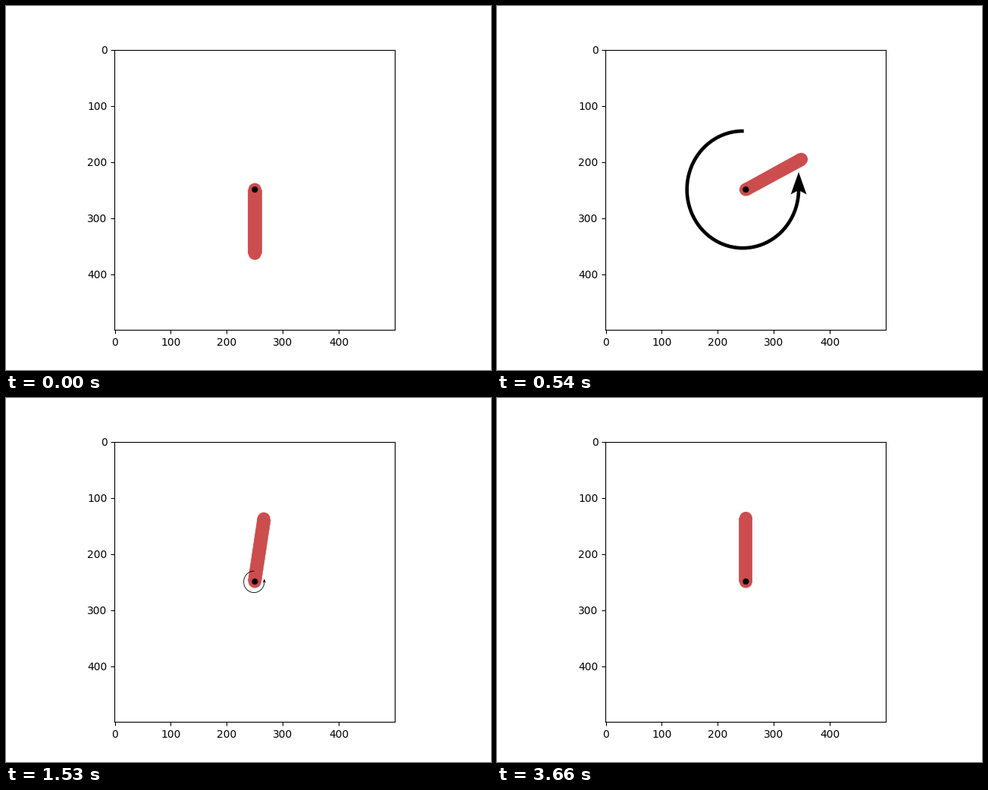
Recreate the animation shown at these times as a matplotlib script. Size 640 px wide and 480 px high, loop 6440 ms.

```python
import numpy as np
import matplotlib.pyplot as plt
from matplotlib.animation import FuncAnimation
from matplotlib.patches import Circle, Polygon

LOOP, TICK = 6440, 20          # ms
SIZE, MID = 500, 250           # canvas in data pixels
UNIT = SIZE / 4.4              # rod length
HALF = 0.1 * UNIT              # half rod width
PX = 0.7392                    # screen pixels per data pixel
RED = (0.8, 0.3, 0.3)
KP, KD, MAX_TORQUE, DT = 17.0, 10.33, 5.0, 0.05


def simulate(steps):
    """Pendulum swung upright by a clipped PD controller."""
    err, speed = np.pi, 0.0
    states = [(err, 0.0)]
    for _ in range(steps):
        torque = np.clip(KP * err - KD * speed, -MAX_TORQUE, MAX_TORQUE)
        speed += DT * (3 * torque - 15 * np.sin(err))
        err -= DT * speed
        states.append((err, torque))
    return states


def step_at(ms):
    if ms < 2340:
        return ms // 30
    return 78 + int((ms - 2340) / 33.333)


def place(along, across, err):
    """Rod coordinates to whole canvas pixels, y pointing down."""
    s, c = np.sin(err), np.cos(err)
    x = int(MID + along * s + across * c)
    y = int(MID + along * c - across * s)
    return x, SIZE - 1 - y


STATES = simulate(200)

# Arrow in units of its own size, centred on zero, y down
ARC = np.radians(np.linspace(89, 360, 140))
RING = np.column_stack([-0.025 + 0.4595 * np.cos(ARC), -0.481 * np.sin(ARC)])
TIP_X = 0.4345
HEAD = np.array([(TIP_X, -0.144), (TIP_X + 0.065, 0.040),
                 (TIP_X, 0.005), (TIP_X - 0.065, 0.040)])

fig, ax = plt.subplots(figsize=(6.4, 4.8), dpi=100)
ax.set_aspect("equal")
ax.set_xlim(-0.5, SIZE - 0.5)
ax.set_ylim(SIZE - 0.5, -0.5)

pivot = (MID, SIZE - 1 - MID)
rod = Polygon([pivot] * 4, fc=RED, ec=RED, lw=PX * 0.72, joinstyle="round", zorder=1)
tip = Circle(pivot, 11.5, fc=RED, lw=0, zorder=1.1)
head = Polygon([pivot] * 4, fc="black", lw=0, zorder=1.3)
for patch in (rod, tip, head,
              Circle(pivot, 11.5, fc=RED, lw=0, zorder=1.1),
              Circle(pivot, 5.5, fc="black", lw=0, zorder=1.4)):
    ax.add_patch(patch)
ring, = ax.plot([], [], color="black", solid_capstyle="butt", zorder=1.2)


def draw(i):
    err, torque = STATES[min(step_at(i * TICK + TICK // 2), 200)]
    rod.set_xy([place(l, w, err) for l, w in
                ((0, -HALF), (0, HALF), (UNIT, HALF), (UNIT, -HALF))])
    tip.center = place(UNIT, 0, err)

    size = int(UNIT * abs(torque) / 2)
    for part in (ring, head):
        part.set_visible(size > 0)
    if size:
        c = MID - size // 2 - 0.5 + size / 2
        scale = np.array([size if torque > 0 else -size, size])
        shift = np.array([c, SIZE - 1 - c])
        ring.set_data(*(RING * scale + shift).T)
        ring.set_linewidth(0.029 * size * PX * 0.72)
        head.set_xy(HEAD * scale + shift)
    return rod, tip, ring, head


anim = FuncAnimation(fig, draw, frames=LOOP // TICK, interval=TICK,
                     repeat=True, repeat_delay=0)
plt.show()
```
